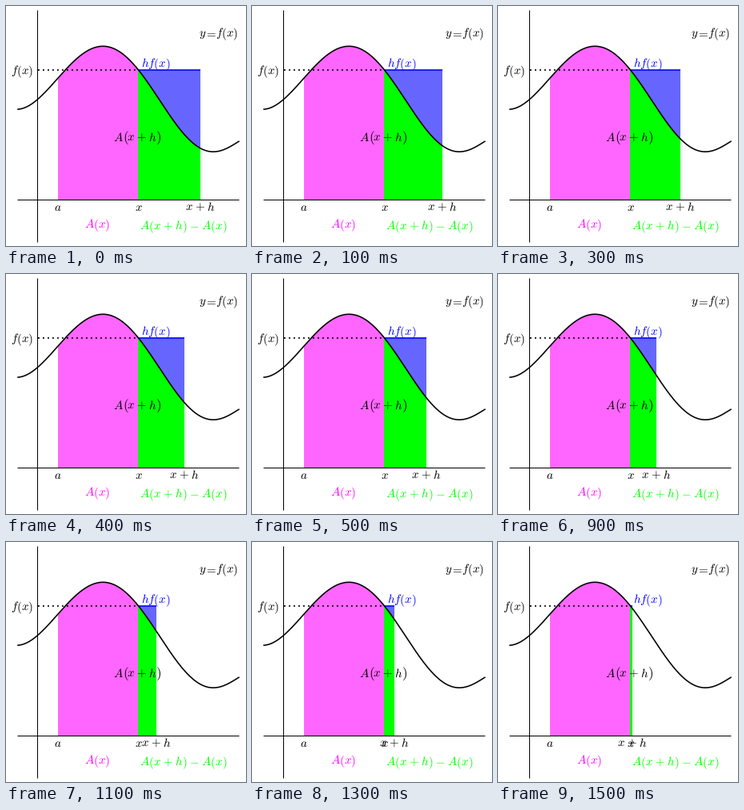
These frames come from a looping animation (300x300 px, 1600 ms). A matplotlib script:

```python
import numpy as np
import matplotlib.pyplot as plt
from matplotlib.animation import FuncAnimation
from matplotlib.patches import Polygon

SIZE, DPI = 300, 100
PX = 72 / DPI                      # points per pixel
FRAMES, INTERVAL = 16, 100

A, X, BASE, TOP = 65, 165, 242.5, 80
EDGE_START, EDGE_STEP = 243, 5
PINK, GREEN, SKY = "#ff66ff", "#00ff00", "#6666ff"

plt.rcParams["mathtext.fontset"] = "cm"
plt.rcParams["text.hinting"] = "none"

# Smooth curve through a few points, in pixels from the top left
knots = np.array([
    (15, 129.3), (40, 115.5), (65, 91), (90, 64.7), (105, 54), (121.5, 49.7),
    (140, 55.6), (165, 79.8), (188, 112), (208, 141.5), (228, 166), (243, 177),
    (260, 182.4), (275, 179), (291, 169),
])
curve = np.polynomial.Polynomial.fit(knots[:, 0], knots[:, 1], 6)

fig = plt.figure(figsize=(SIZE / DPI, SIZE / DPI), dpi=DPI, facecolor="white")
ax = fig.add_axes([0, 0, 1, 1])
ax.set_xlim(0, SIZE)
ax.set_ylim(SIZE, 0)
ax.axis("off")


def under_curve(left, right, level):
    """Outline of the region between the curve and a horizontal level."""
    xs = np.linspace(left, right, 80)
    top = np.column_stack([xs, curve(xs)])
    return np.vstack([top, [(right, level), (left, level)]])


def region(color):
    patch = Polygon([(0, 0), (0, 0), (0, 0)], fc=color, ec="none", lw=0,
                    zorder=1, snap=False)
    return ax.add_patch(patch)


def line(xs, ys, width=1.0, color="black", **kw):
    return ax.plot(xs, ys, color=color, lw=width * PX, snap=False, **kw)[0]


def label(x, y, tex, color="black", size=15):
    return ax.text(x, y, f"${tex}$", color=color, fontsize=size * PX,
                   ha="center", va="baseline", zorder=5)


area, strip, excess = region(PINK), region(GREEN), region(SKY)
area.set_xy(under_curve(A, X, BASE))

lid = line([], [], 1.6, "#0000ff", zorder=2, solid_capstyle="butt")
line([40, X], [TOP, TOP], 1.8, zorder=2, dashes=(1, 2.33), dash_capstyle="butt")
line([15, 291], [BASE, BASE], zorder=3)
line([39.5, 39.5], [6, 295], zorder=3)
xs = np.linspace(15, 291, 300)
line(xs, curve(xs), 1.6, zorder=4)

SUM = r"x\hspace{0.07}+\hspace{0.07}h"

label(245.5, 38, "y")
label(256, 38, "=")
label(276, 38, "f(x)")
label(20.5, 85, "f(x)")
label(187, 76, "hf(x)", "#0000ff")

label(140.5, 169, "A")
label(150, 169, "(", size=17)
label(169.5, 169, SUM)
label(190, 169, ")", size=17)

label(A, 256, "a")
label(X + 0.5, 256, "x")
label(113.5, 277, "A(x)", "#ff00ff")
label(222, 279, SUM.join(["A(", ")"]) + r"\hspace{0.07}-\hspace{0.07}A(x)", GREEN)
edge_label = label(EDGE_START, 256, SUM)


def update(i):
    edge = EDGE_START - EDGE_STEP * i
    strip.set_xy(under_curve(X, edge, BASE))
    excess.set_xy(under_curve(X, edge, TOP))
    lid.set_data([X, edge], [TOP, TOP])
    edge_label.set_x(edge)
    return strip, excess, lid, edge_label


anim = FuncAnimation(fig, update, frames=FRAMES, interval=INTERVAL,
                     init_func=lambda: update(0), repeat=True, repeat_delay=0)
plt.show()
```
